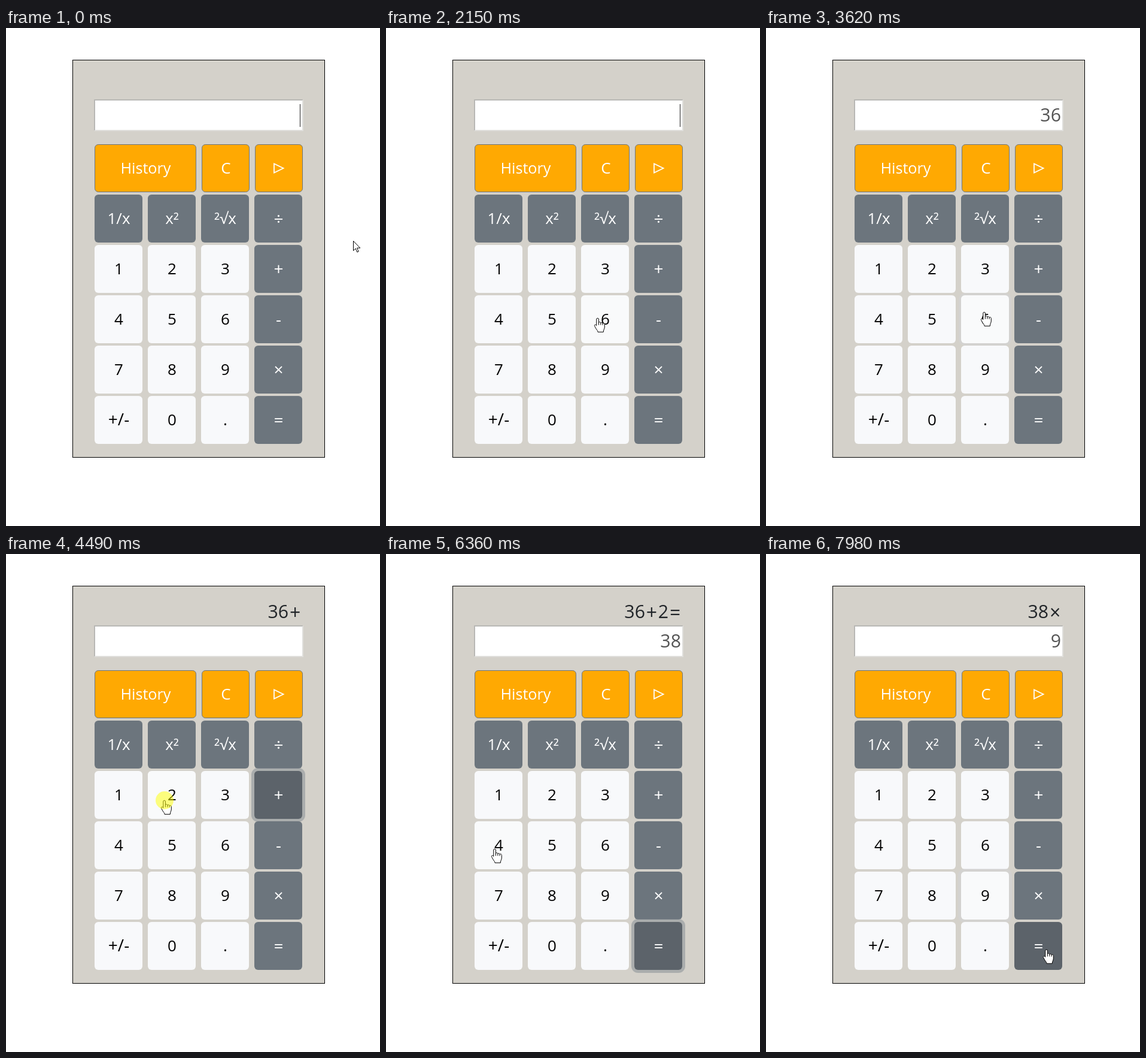
These frames come from a looping animation (625x831 px, 8000 ms). An HTML page:

```html
<!DOCTYPE html>
<html lang="en">
<head>
<meta charset="utf-8">
<title>Calculator</title>
<style>
  html, body { margin: 0; width: 100%; height: 100%; overflow: hidden; background: #fff; }
  svg { display: block; width: 100%; height: 100%; }
  text { font-family: "Open Sans", "Noto Sans", sans-serif; }
</style>
</head>
<body>
<svg viewBox="0 0 625 831">
  <rect width="625" height="831" fill="#fff"/>
  <rect x="111.5" y="53.5" width="421" height="663" fill="#d4d1ca" stroke="#000"/>
  <path d="M147 119H497L495 121H149V170L147 172z" fill="#b9b8b5"/>
  <path d="M497 119V172H147L149 170H495V121z" fill="#e0dfdc"/>
  <rect x="149" y="121" width="346" height="49" fill="#fff"/>
  <rect id="caret" x="491" y="127" width="1" height="38" fill="#222"/>
  <text id="sum" y="107" fill="#212529" text-anchor="end"></text>
  <text id="entry" x="493" y="156" font-size="30.3" fill="#555" text-anchor="end"></text>
  <g id="keys"></g>
  <g id="pointer" stroke="#000" stroke-linejoin="round">
    <path id="arrow" d="M.5 .5V16.5L4.2 13L6.8 19L9.2 18L6.6 12.1H11.8z" fill="#fff"/>
    <g id="hand">
      <path fill="#fff" d="M-2.2 12.5V2a1.8 1.8 0 0 1 3.6 0V8c0-2 3.4-2 3.4.6c.4-1.8 3.3-1.4 3.3.8c.5-1.5 3.2-1 3.2 1.2V15c0 3-2 4.5-2 8.3H0c0-2.5-2-3.5-3-5.5L-5.4 13.4c-1-2 1.4-3 2.2-1.8z"/>
      <path fill="none" d="M1.4 8v3.6M4.8 8.6v3M8.1 9.4v2.4"/>
    </g>
    <circle id="glow" r="15" fill="#ff0" fill-opacity=".5" stroke="none"/>
  </g>
</svg>
<script>
const NS = "http://www.w3.org/2000/svg";
const $ = id => document.getElementById(id);
const LOOP = 8000, TICK = 77.6, SHIFT = 28, BLINK = 530;
const SIZE = 80, RADIUS = 6.2, RING = 5;
const PRESS = 2; // ticks a button stays down

function set(el, attrs) {
  for (const k in attrs) el.setAttribute(k, attrs[k]);
  return el;
}

function add(parent, tag, attrs, text = "") {
  const el = set(document.createElementNS(NS, tag), attrs);
  el.textContent = text;
  return parent.appendChild(el);
}

const THEME = {
  top: { fill: "#ffa902", hover: "#ffa902", ink: "#fff", ring: "none" },
  dark: { fill: "#6c757d", hover: "#5c636a", ink: "#fff", ring: "#828a91" },
  light: { fill: "#f8f9fb", hover: "#f9fafb", ink: "#000", ring: "#d3d4d8" }
};
const keys = [];

function addKey(label, x, y, w, kind) {
  const theme = THEME[kind], g = $("keys");
  const ring = add(g, "rect", { fill: theme.ring, "fill-opacity": .5 });
  const edge = kind === "top" ? .5 : 0;
  const face = add(g, "rect", {
    x: x + edge, y: y + edge, width: w - 2 * edge, height: SIZE - 2 * edge, rx: RADIUS - edge,
    stroke: edge ? "#6c757d" : "none"
  });
  const cx = x + w / 2;
  if (label === "▷") {
    add(g, "path", { d: `M${cx - 8} 226.5V241.5L${cx + 7.5} 234z`, fill: "none", stroke: "#fff", "stroke-width": 1.8 });
  } else {
    const sign = "÷+-×=+/-".includes(label);
    add(g, "text", {
      x: cx + .5, y: y + (sign && kind === "dark" ? 50 : 49),
      "font-size": label === "History" ? 25.2 : sign ? 28 : 26,
      fill: theme.ink, "text-anchor": "middle"
    }, label);
  }
  keys.push({ label, x, y, w, theme, ring, face });
}

addKey("History", 148, 194, 170, "top");
addKey("C", 327, 194, SIZE, "top");
addKey("▷", 416, 194, SIZE, "top");
["1/x x² ²√x ÷", "1 2 3 +", "4 5 6 -", "7 8 9 ×", "+/- 0 . ="].forEach((row, r) =>
  row.split(" ").forEach((label, c) =>
    addKey(label, 148 + 89 * c, 278 + 84 * r, SIZE, r && c < 3 ? "light" : "dark")));

const keyAt = (x, y) =>
  keys.find(k => x >= k.x && x < k.x + k.w && y >= k.y && y < k.y + SIZE);

// pointer stops: arrival tick, place, ticks of rest
const stop = (at, x, y, rest = 0) => ({ at, x, y, rest });
const click = (...args) => ({ ...stop(...args), clicks: true });
const STOPS = [
  stop(0, 580, 355, 4), stop(8, 562, 391, 3), stop(22, 374, 521), stop(25, 342, 520),
  stop(28, 354, 484), stop(30, 358, 474, 3),
  click(39, 344, 405, 2), click(45, 365, 474, 3), click(52, 450, 410, 2),
  click(58, 265, 411, 3), click(67, 428, 621, 3),
  stop(74, 482, 575), stop(82, 182, 492, 2),
  click(91, 443, 577, 2), click(97, 375, 560, 3), stop(103, 469, 660)
];
const CLICKS = STOPS.filter(s => s.clicks)
  .map(s => ({ key: keyAt(s.x, s.y), down: s.at, up: s.at + PRESS }));

function pointerAt(n) {
  const i = STOPS.findLastIndex(s => s.at <= n);
  const a = STOPS[i], b = STOPS[i + 1] || a, leave = a.at + a.rest;
  const u = n <= leave ? 0 : (n - leave) / (b.at - leave);
  const e = u * u * (3 - 2 * u);
  return [a.x + (b.x - a.x) * e, a.y + (b.y - a.y) * e];
}

function calculate(labels) {
  let sum = "", entry = "";
  for (const label of labels) {
    if (/\d/.test(label)) {
      entry += label;
    } else if (label === "=") {
      const total = parseFloat(sum) + Number(entry);
      sum += entry + "=";
      entry = String(total);
    } else {
      sum = entry + label;
      entry = "";
    }
  }
  return { sum, entry };
}

// signs are wider and sit lower than digits
function showSum(str) {
  const el = $("sum");
  if (el.textContent === str) return;
  el.textContent = "";
  el.setAttribute("x", 492.3);
  let low = 0;
  for (const part of str.match(/\d+|\D/g) || []) {
    const sign = /\D/.test(part), drop = sign ? 2 : 0;
    add(el, "tspan", { dx: low || sign ? 1.8 : 0, dy: drop - low, "font-size": sign ? 32 : 30.3 }, part);
    low = drop;
  }
}

function draw(t) {
  const n = Math.floor((t + SHIFT) / TICK);
  const [x, y] = pointerAt(n);
  const over = keyAt(x, y);
  const done = CLICKS.filter(c => c.up <= n);
  const focus = done[done.length - 1];

  for (const k of keys) {
    const focused = !!focus && focus.key === k;
    k.face.setAttribute("fill", k === over || focused ? k.theme.hover : k.theme.fill);
    const u = focused ? Math.min(1, (n - focus.up + 1) / 2) : 0;
    const s = RING * (1 - (1 - u) ** 2);
    set(k.ring, {
      x: k.x - s, y: k.y - s, width: k.w + 2 * s, height: SIZE + 2 * s, rx: RADIUS + s,
      visibility: focused ? "visible" : "hidden"
    });
  }

  const show = (id, on) => $(id).setAttribute("visibility", on ? "visible" : "hidden");
  show("hand", over);
  show("arrow", !over);
  show("glow", CLICKS.some(c => c.down <= n && n < c.up));
  show("caret", !focus && Math.floor((t + 10) / BLINK) % 2 === 0);
  $("pointer").setAttribute("transform", `translate(${x.toFixed(1)} ${y.toFixed(1)})`);
  const { sum, entry } = calculate(done.map(c => c.key.label));
  showSum(sum);
  $("entry").textContent = entry;
}

const start = performance.now();
function loop() {
  draw((performance.now() - start) % LOOP);
  requestAnimationFrame(loop);
}
loop();
</script>
</body>
</html>
```
